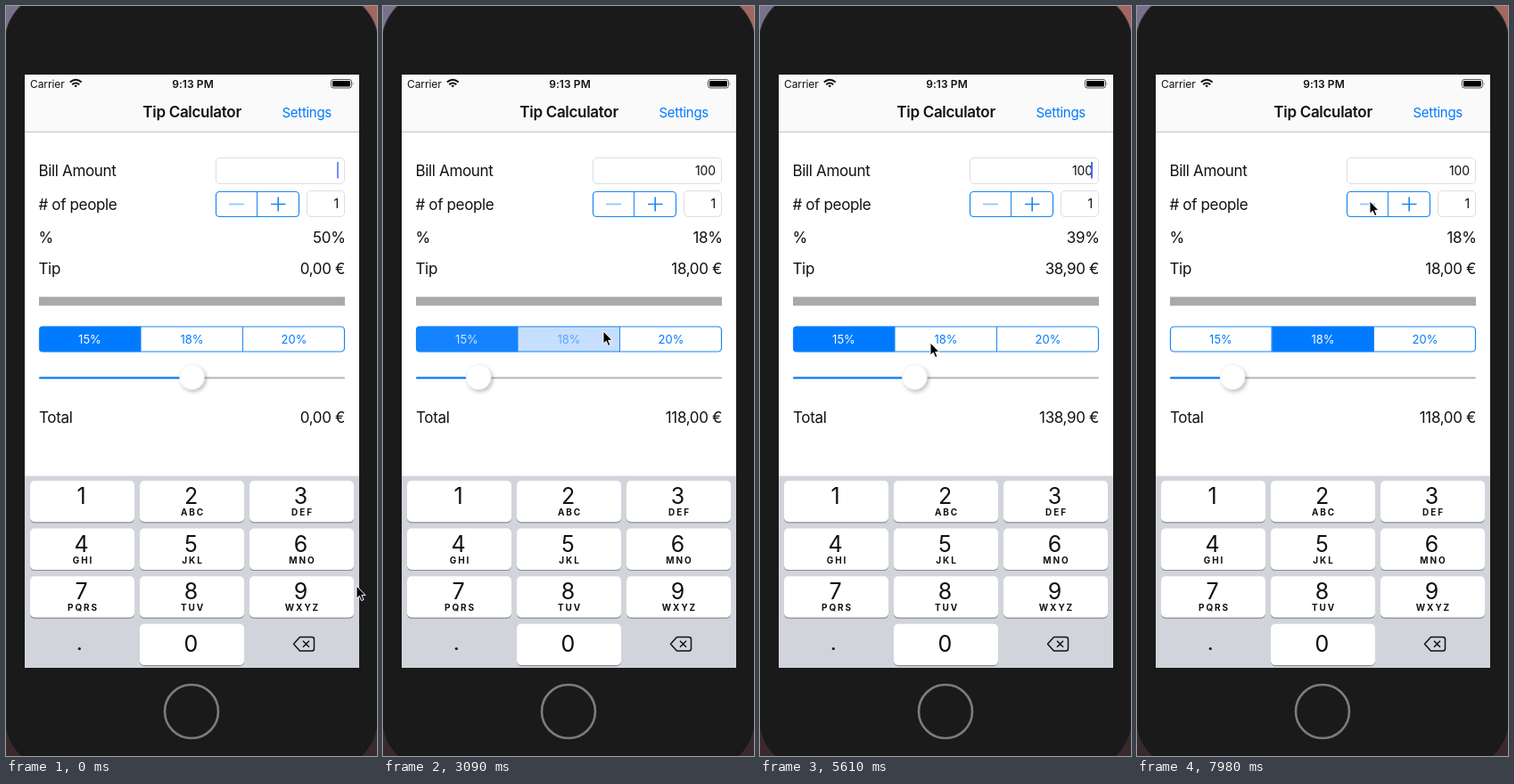
These frames come from a looping animation (416x842 px, 8000 ms). An HTML page:

```html
<!DOCTYPE html>
<html lang="en">
<head>
<meta charset="utf-8">
<title>Tip Calculator</title>
<style>
html, body { margin: 0; width: 100%; height: 100%; overflow: hidden; background: #1a1a1a; }
svg { display: block; width: 416px; height: 842px; }
text { font: 17px Inter, "Liberation Sans", sans-serif; letter-spacing: -.35px; fill: #111; }
.blue { fill: #007aff; }
.end { text-anchor: end; }
.mid { text-anchor: middle; }
.field { fill: #fff; stroke: #dedede; }
.line { fill: none; stroke: #1a85f2; }
.small { font-size: 14px; letter-spacing: -.1px; }
.status { font-size: 12px; letter-spacing: -.1px; }
.seg { font-size: 13px; letter-spacing: 0; }
.digit { font-size: 25px; letter-spacing: 0; }
.letters { font-size: 10px; font-weight: 700; letter-spacing: 1.9px; }
</style>
</head>
<body>
<svg viewBox="0 0 416 842">
  <defs>
    <linearGradient id="wall" x2="1" y2="0">
      <stop stop-color="#77718c"/><stop offset="1" stop-color="#a4665f"/>
    </linearGradient>
    <filter id="soft" x="-50%" y="-50%" width="200%" height="200%">
      <feDropShadow dy="2.5" stdDeviation="2" flood-opacity=".25"/>
    </filter>
    <clipPath id="bar"><rect x="37" y="359.5" width="343" height="29" rx="4"/></clipPath>
  </defs>

  <rect width="416" height="421" fill="url(#wall)"/>
  <rect y="421" width="416" height="421" fill="#3a292d"/>
  <rect x="-2" y="-18" width="420" height="878" rx="62" fill="#1a1a1a" stroke="#303030"/>
  <circle cx="208" cy="792" r="30" fill="#1a1a1a" stroke="#7c7c7c" stroke-width="2.6"/>

  <rect x="21" y="77" width="375" height="666" fill="#fff"/>
  <rect x="21" y="77" width="375" height="64" fill="#fafafa"/>
  <path d="M21 141.3H396" stroke="#bcbcbc"/>

  <text class="status" x="27" y="91.6">Carrier</text>
  <g fill="none" stroke="#111" stroke-width="2">
    <path d="M71.8 85.6Q78.2 79.9 84.7 85.6M74.2 88.2Q78.2 84.7 82.3 88.2"/>
    <path d="M76.4 89.5Q78.2 88 80 89.5L78.2 91.6Z" fill="#111" stroke="none"/>
  </g>
  <text class="status mid" x="209.5" y="91.6" font-weight="600" style="font-weight:600;letter-spacing:.1px">9:13 PM</text>
  <rect x="364.5" y="82.5" width="23" height="9.5" rx="2.5" fill="none" stroke="#555"/>
  <rect x="366" y="84" width="20" height="6.5" rx="1.2" fill="#000"/>
  <path d="M388.8 85.5q1.5 1.8 0 3.6z" fill="#555"/>

  <text class="mid" x="208.6" y="125.3" style="font-weight:600;letter-spacing:-.3px">Tip Calculator</text>
  <text class="blue" x="309.5" y="124.9" style="font-size:15px;letter-spacing:-.3px">Settings</text>

  <text x="36.5" y="190.6">Bill Amount</text>
  <text x="36.5" y="228.5">#&#160;of people</text>
  <text x="36.5" y="265.5">%</text>
  <text x="36.5" y="300.5">Tip</text>
  <text x="37" y="467.8">Total</text>

  <rect class="field" x="235.5" y="170.5" width="144" height="29" rx="4.5"/>
  <rect class="field" x="337.5" y="207.5" width="42" height="29" rx="4.5"/>
  <rect id="plusBg" x="282" y="208.5" width="46" height="28" fill="#c7dfff"/>
  <rect id="minusBg" x="236" y="208.5" width="45" height="28" fill="#c7dfff"/>
  <path class="line" d="M281.5 208.5V236.5" />
  <rect class="line" x="235.5" y="208.5" width="93" height="28" rx="4" stroke-width="1.2"/>
  <path id="minus" class="line" d="M250 222.5H267" stroke-width="1.6"/>
  <path class="line" d="M297 222.5H313.500M305.200 214.500V230.500" stroke-width="1.6"/>

  <text id="bill" class="small end" x="373" y="189.6"></text>
  <rect id="caret" x="371" y="175" width="2" height="18.500" fill="#426bf2"/>
  <text id="people" class="small end" x="373" y="227.200"></text>
  <text id="percent" class="end" x="380.500" y="265.500"></text>
  <text id="tip" class="end" x="380" y="300.500"></text>
  <text id="total" class="end" x="380" y="467.500"></text>

  <rect x="37" y="326.500" width="343" height="10" fill="#a9a9a9"/>
  <g id="segs" clip-path="url(#bar)"></g>
  <rect class="line" x="37.500" y="360" width="342" height="28" rx="4" stroke-width="1.200"/>

  <rect x="37" y="416.500" width="343" height="2" rx="1" fill="#b5b5b5"/>
  <rect id="track" x="37" y="416.500" height="2" rx="1" class="blue"/>
  <circle id="thumb" cy="416.500" r="14" fill="#fff" stroke="#e2e2e2" stroke-width=".5" filter="url(#soft)"/>

  <rect x="21" y="527.500" width="375" height="215.500" fill="#d1d5db"/>
  <g id="keys"></g>
  <circle cx="82.300" cy="721.500" r="1.600" fill="#111"/>
  <path d="M329.500 708.500H343Q345.500 708.500 345.500 711V721.500Q345.500 724 343 724H329.500L322.500 716.200ZM333 712.700L340 719.700M340 712.700L333 719.700"
        fill="none" stroke="#111" stroke-width="1.500" stroke-linejoin="round"/>

  <path id="cursor" d="M0 0V14.200L3.300 11.200L5.600 16.500L8 15.500L5.700 10.400H10Z" fill="#000" stroke="#fff" stroke-width="1"/>
</svg>
<script>
const $ = id => document.getElementById(id);
const LOOP = 8000, STEP = 147.5;

// Number pad
const letters = ['', 'ABC', 'DEF', 'GHI', 'JKL', 'MNO', 'PQRS', 'TUV', 'WXYZ'];
function key(name, col, row, sub) {
  const x = 27 + col * 123, y = 533 + row * 53.6, mid = x + 58.5;
  return `<rect x="${x}" y="${y + 1}" width="117" height="46.5" rx="5" fill="#8b8d92"/>
    <rect id="key${name}" x="${x}" y="${y}" width="117" height="46.3" rx="5" fill="#fff"/>
    <text class="digit mid" x="${mid - 1}" y="${y + (name ? 26 : 31.6)}">${name}</text>
    <text class="letters mid" x="${mid + 1}" y="${y + 39.2}">${sub}</text>`;
}
$('keys').innerHTML = letters.map((s, i) => key(i + 1, i % 3, Math.floor(i / 3), s)).join('') + key(0, 1, 3, '');

// Segmented control
const rates = [15, 18, 20];
$('segs').innerHTML = rates.map((r, i) =>
  `<rect id="seg${i}" x="${37 + i * 114.3}" y="359.5" width="114.3" height="29"/>
   <text id="rate${i}" class="seg mid" x="${94 + i * 114.5}" y="378.7">${r}%</text>`).join('') +
  '<path class="line" d="M151 360V388M265.5 360V388"/>';

// All schedules below count in steps: [step, value...]
const path = [[0, 393, 651], [1, 365, 640], [5, 126, 558], [6, 125, 556], [8, 170, 680], [10, 203, 706],
  [14, 203, 707], [16, 230, 480], [20, 247, 367], [21, 247, 365], [23, 318, 371], [24, 318, 374],
  [26, 121, 378], [28, 121, 379], [29, 121, 414], [30, 99, 416], [34, 175, 416], [38, 191, 378],
  [40, 200, 373], [43, 265, 322], [46, 303, 221], [48, 303, 222], [50, 225, 224], [52, 261, 219], [54, 261, 219]];
const bills = [[0, 0], [6, 1], [12, 10], [14, 100]];
const tips = [[0, 50], [20, 50], [21, 18], [23, 18], [24, 20], [27, 20], [28, 15], [30, 15],
  [34, 38.9], [39, 38.9], [40, 18]];
const picks = [[0, 0], [22, 1], [25, 2], [28, 0], [41, 1]];
const touches = { 20: 1, 21: 1, 24: 2, 39: 1, 40: 1 };
const counts = [[0, 1], [47, 2], [53, 1]];

const last = (list, k) => list.filter(p => p[0] <= k).pop();
function at(list, k, i = 1) {
  const a = last(list, k), b = list[list.indexOf(a) + 1];
  return b ? a[i] + (b[i] - a[i]) * (k - a[0]) / (b[0] - a[0]) : a[i];
}
const euro = v => v.toFixed(2).replace('.', ',') + ' €';
const set = (id, name, value) => $(id).setAttribute(name, value);

function caretAlpha(k) {
  if (k === 0) return .75;
  if (k < 4) return 0;
  const t = k * STEP;
  if (t < 2600) return 1;
  return t % 1000 >= 200 && t % 1000 < 700 ? 1 : 0;
}

function draw(ms) {
  const k = Math.floor((ms % LOOP + 8) / STEP);
  const bill = last(bills, k)[1], pct = at(tips, k), people = last(counts, k)[1];
  const tip = bill * pct / 100;
  $('bill').textContent = bill || '';
  $('people').textContent = people;
  $('percent').textContent = Math.round(pct) + '%';
  $('tip').textContent = euro(tip);
  $('total').textContent = euro((bill + tip) / people) + (people > 1 ? ' per person' : '');
  set('caret', 'opacity', caretAlpha(k));

  const x = 50 + 3.17 * pct;
  set('thumb', 'cx', x);
  set('track', 'width', x - 37);

  const pick = last(picks, k)[1], touch = touches[k];
  rates.forEach((r, i) => {
    const on = i === pick, held = i === touch;
    set('seg' + i, 'fill', on ? (touch ? '#1583ff' : '#007aff') : held ? '#c7dfff' : '#fff');
    $('rate' + i).style.fill = on ? (touch ? '#cfe5ff' : '#fff') : held ? '#5aa5fa' : '#007aff';
  });

  set('minus', 'opacity', people > 1 ? 1 : .5);
  set('plusBg', 'opacity', k === 47 ? 1 : 0);
  set('minusBg', 'opacity', k === 53 ? 1 : 0);
  set('key0', 'fill', k === 12 || k === 14 ? '#b4b9c2' : '#fff');
  set('cursor', 'transform', `translate(${at(path, k)} ${at(path, k, 2)})`);
}

function tick() {
  draw(performance.now());
  requestAnimationFrame(tick);
}
tick();
</script>
</body>
</html>
```
